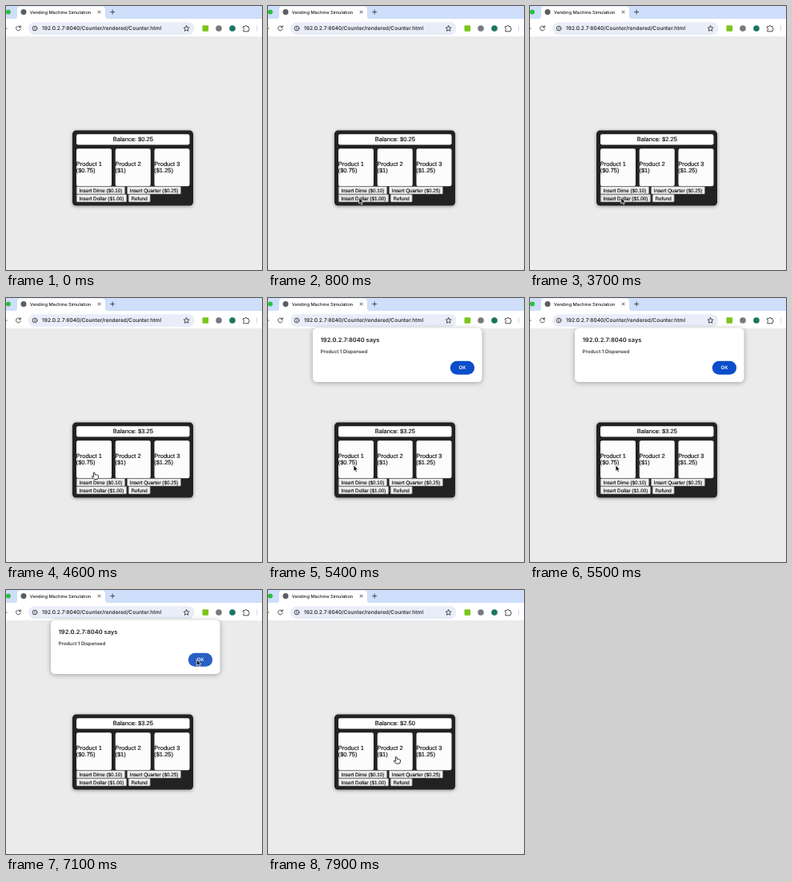
Write an HTML page that moves like this. It is 320 by 330 pixels and loops after 8000 ms.

```html
<!DOCTYPE html>
<html lang="en">
<head>
<meta charset="utf-8">
<title>Vending Machine Simulation</title>
<style>
  html, body { margin: 0; width: 100%; height: 100%; overflow: hidden; background: #ebebeb; }
  svg { display: block; width: 100vw; height: 100vh; }
  text { white-space: pre; text-rendering: geometricPrecision; }
  .ui { font-family: Inter, Roboto, sans-serif; font-weight: 500; fill: #1f1f1f; }
  .bold { font-weight: 600; }
  .page { font-family: "Liberation Sans", Arial, sans-serif; font-size: 7.53px; fill: #000; stroke: #000; stroke-width: .12; }
  .label { font-size: 6.3px; }
  .line { fill: none; stroke: #3c3c3c; stroke-width: .9; stroke-linecap: round; stroke-linejoin: round; }
  .machine { filter: drop-shadow(0 1px 2px rgba(0, 0, 0, .4)); }
  #dialog { filter: drop-shadow(0 1.5px 3px rgba(0, 0, 0, .32)); }
  .pointer { fill: #111; stroke: #fff; stroke-width: .7; stroke-linejoin: round; }
</style>
</head>
<body>
<svg viewBox="0 0 320 330" preserveAspectRatio="none">
  <rect width="320" height="330" fill="#ebebeb"/>

  <!-- tab strip -->
  <rect width="320" height="17" fill="#cedefb"/>
  <path d="M10 16.5q4 0 4-4V4.500q0-4 4-4H120q4 0 4 4v8q0 4 4 4z" fill="#fff"/>
  <circle cx="2.800" cy="7.500" r="3" fill="#2ac13f"/>
  <circle cx="22" cy="7.500" r="3.500" fill="#5a5e63"/>
  <text class="ui" x="29.700" y="9.700" font-size="5.650">Vending Machine Simulation</text>
  <path class="line" d="M115.100 6.100l2.800 2.800m0-2.800l-2.800 2.800M130.700 7.500h5M133.200 5v5"/>

  <!-- toolbar -->
  <rect y="16" width="320" height="23" fill="#fff"/>
  <rect y="38.300" width="320" height=".7" fill="#dfe1e5"/>
  <rect x="28" y="20.300" width="207.500" height="15.700" rx="7.850" fill="#e9edf9"/>
  <path class="line" d="M-3 28H1M17.900 26.300A2.900 2.900 0 1 0 18.300 28.700M18.300 24.700v2h-2"/>
  <circle class="line" cx="36" cy="28" r="2.900"/>
  <path class="line" d="M36 27.800v1.500M36 26.400v.1"/>
  <text class="ui" x="45" y="30.300" font-size="6.600">192.0.2.7:8040/Counter/rendered/Counter.html</text>
  <path class="line" d="M225.600 24.500l1.050 2.300 2.500.3-1.850 1.700.5 2.500-2.200-1.250-2.200 1.250.5-2.500-1.850-1.700 2.500-.3z"/>
  <rect x="245.500" y="24.200" width="7.600" height="7.600" rx="1" fill="#7cc51d"/>
  <circle cx="266" cy="28" r="3.800" fill="#77797c"/>
  <circle cx="283" cy="28" r="3.800" fill="#1b7561"/>
  <path class="line" d="M296.800 25.600h2a1.150 1.150 0 0 1 2.300 0h2v2.100a1.150 1.150 0 0 1 0 2.300v1.800h-6.300v-2a1.150 1.150 0 0 0 0-2.200z"/>
  <path d="M313.500 24.500v7" stroke="#c7dafc"/>

  <!-- vending machine -->
  <rect class="machine" x="83" y="155.600" width="151" height="94" rx="4.500" fill="#222"/>
  <rect x="88" y="160.300" width="141.500" height="13.200" rx="2.300" fill="#fff"/>
  <text id="balance" class="page" x="158.800" y="169.300" text-anchor="middle"></text>
  <g id="products"></g>
  <g id="buttons"></g>

  <g id="dialog">
    <rect x="56" y="37.500" width="211.500" height="67.500" rx="5.500" fill="#fff"/>
    <text class="ui bold" x="65.700" y="54.800" font-size="7.500">192.0.2.7:8040 says</text>
    <text class="ui" x="65.700" y="68.700" font-size="6">Product 1 Dispensed</text>
    <rect id="ok" x="227.800" y="78.700" width="30.300" height="17" rx="8.500"/>
    <text class="ui bold" x="243" y="89.400" font-size="6" text-anchor="middle" style="fill:#fff">OK</text>
  </g>

  <path id="arrow" class="pointer" d="M0-.2v7.800l1.750-1.550 1.200 2.700 1.400-.6-1.200-2.600h2.350z"/>
  <path id="hand" class="pointer" style="fill:#fff;stroke:#111;stroke-width:.85" d="M-1.300.5q.8-1.100 1.700 0l.6 2.600q.9-.7 1.500.1 1-.5 1.400.3 1.100-.2 1.200.8L4.800 6.500 4 8.500H-.4L-3.100 5.600q-.1-1.400 1.200-.9l1.200 1z"/>
</svg>
<script>
  const $ = id => document.getElementById(id);
  const PRODUCT_X = [88, 136.75, 185.5];
  const PRICES = ["$0.75", "$1", "$1.25"];

  $("products").innerHTML = PRODUCT_X.map((x, i) => `
    <rect x="${x}" y="178.200" width="44" height="47" rx="2.300" fill="#fcfcfc"/>
    <text class="page" x="${x - .3}" y="200">Product ${i + 1}</text>
    <text class="page" x="${x - .3}" y="208.400">(${PRICES[i]})</text>`).join("");

  const button = (x, y, w, label, id = "") => `
    <rect ${id && `id="${id}"`} x="${x}" y="${y}" width="${w}" height="9.300" rx=".8"
      fill="#efefef" stroke="#777" stroke-width=".6"/>
    <text class="page label" x="${x + w / 2}" y="${y + 6.9}" text-anchor="middle">${label}</text>`;

  $("buttons").innerHTML =
    button(88.2, 225.7, 60.5, "Insert Dime ($0.10)") +
    button(151.5, 225.7, 67, "Insert Quarter ($0.25)") +
    button(88.2, 235.6, 62.5, "Insert Dollar ($1.00)", "dollar") +
    button(153.2, 235.6, 27, "Refund");

  // Pointer stops: time, x, y
  const STOPS = [
    [100, 313, 264], [800, 113.7, 239.5], [4400, 113.7, 239.5], [4600, 110.5, 218],
    [5000, 107, 209], [6300, 107, 209], [7100, 238.3, 87], [7300, 238.3, 87], [7900, 160.5, 208.5]
  ];
  const BALANCES = [[0, "0.25"], [1200, "1.25"], [3600, "2.25"], [4000, "3.25"], [7400, "2.50"]];
  const PRESSES = [1100, 3500, 3900];
  const ease = p => p * p * (3 - 2 * p);

  function pointerAt(t) {
    const i = STOPS.findIndex(s => s[0] > t);
    if (i < 0) return STOPS[STOPS.length - 1].slice(1);
    const [t0, x0, y0] = STOPS[Math.max(0, i - 1)], [t1, x1, y1] = STOPS[i];
    const p = i ? ease((t - t0) / (t1 - t0)) : 0;
    return [x0 + (x1 - x0) * p, y0 + (y1 - y0) * p];
  }

  const inside = (x, y, left, top, w, h) => x >= left && x <= left + w && y >= top && y <= top + h;
  const show = (id, on) => $(id).setAttribute("visibility", on ? "visible" : "hidden");

  function draw(now) {
    const t = Math.floor(now % 8000 / 100) * 100;
    const [x, y] = pointerAt(t);
    const open = t >= 5400 && t < 7400;
    const onProduct = !open && PRODUCT_X.some(px => inside(x, y, px, 178, 44, 47));
    const onDollar = t >= 100 && inside(x, y, 88, 235.5, 63, 10);
    const onOk = inside(x, y, 228, 79, 30, 17);

    $("balance").textContent = "Balance: $" + BALANCES.filter(b => b[0] <= t).pop()[1];
    $("dollar").setAttribute("fill", PRESSES.includes(t) ? "#d0d0d0" : onDollar ? "#e2e2e2" : "#efefef");
    $("ok").setAttribute("fill", t === 7300 ? "#3a70c8" : onOk ? "#285fc4" : "#0b4dcb");
    show("dialog", open);
    show("arrow", t >= 100 && !onProduct);
    show("hand", onProduct);
    for (const id of ["arrow", "hand"]) $(id).setAttribute("transform", `translate(${x} ${y})`);
  }

  const start = performance.now();
  function tick() {
    draw(performance.now() - start);
    requestAnimationFrame(tick);
  }
  draw(0);
  requestAnimationFrame(tick);
</script>
</body>
</html>
```
